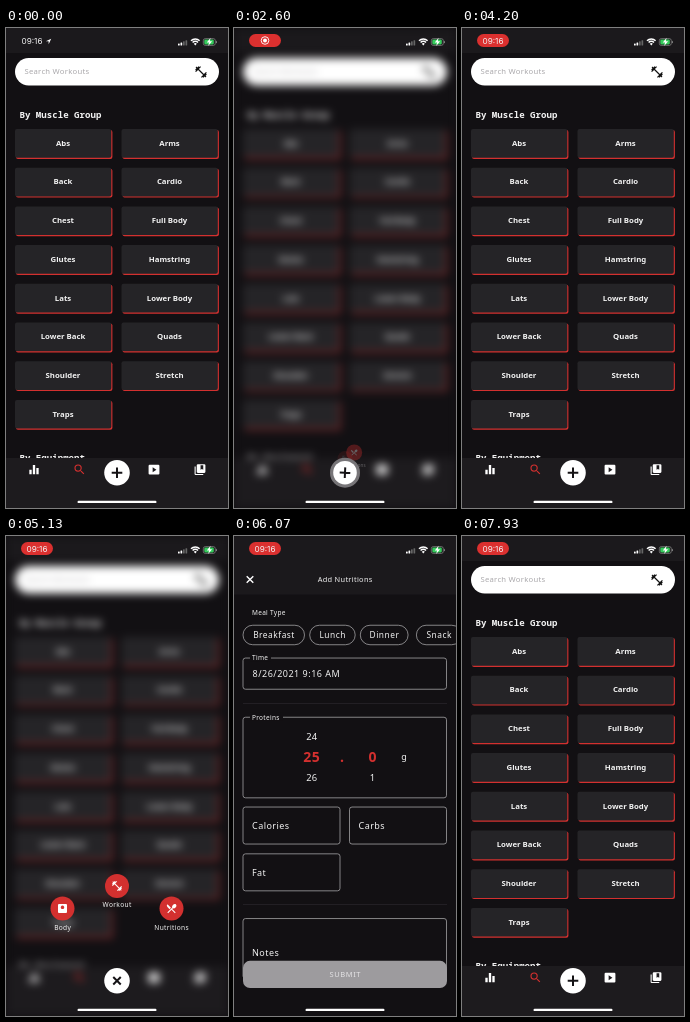
An HTML page for the animation above (8000 ms loop, 222 by 480 pixels).

```html
<!DOCTYPE html>
<html lang="en">
<head>
<meta charset="utf-8">
<title>Workout app</title>
<style>
html, body { margin: 0; height: 100%; overflow: hidden; background: #121013; }
svg { display: block; width: 100vw; height: 100vh; }
text { font-family: "Noto Sans", "Open Sans", sans-serif; fill: #f2f2f2; white-space: pre; }
.mono { font: bold 9.1px "Noto Sans Mono", "DejaVu Sans Mono", monospace; }
.clock { font: 400 8.2px Inter, Roboto, sans-serif; }
.line { fill: none; stroke: #a3a1a4; stroke-width: .8; }
</style>
</head>
<body>
<svg viewBox="0 0 222 480">
  <g id="home"></g>
  <g id="menu"></g>
  <g id="fab">
    <circle id="press" r="15" fill="#777578"/>
    <circle id="disc" r="12.8" fill="#fff"/>
    <path id="plus" d="M-5.3 0H5.3M0-5.3V5.3" stroke="#151316" stroke-width="2"/>
  </g>
  <g id="sheet"></g>
  <g id="status"></g>
  <rect x="71.5" y="472.7" width="79" height="2.4" rx="1.2" fill="#fff"/>
</svg>
<script>
const $ = id => document.getElementById(id);
const RED = '#d3302f';

const rect = (x, y, w, h, rx, attrs) =>
  `<rect x="${x}" y="${y}" width="${w}" height="${h}" rx="${rx}" ${attrs}/>`;
const label = (s, x, y, size, { gap = 0, mid = 0, fill = '#f2f2f2', weight = 400 } = {}) =>
  `<text x="${x + (mid ? gap / 2 : 0)}" y="${y}" font-size="${size}" font-weight="${weight}"
    letter-spacing="${gap}" text-anchor="${mid ? 'middle' : 'start'}" style="fill:${fill}">${s}</text>`;
// 24-unit icon centred on (x, y)
const icon = (name, x, y, size, fill = '#fff') =>
  `<path transform="translate(${x} ${y}) scale(${size / 24}) translate(-12 -12)"
    fill="${fill}" fill-rule="evenodd" d="${ICONS[name]}"/>`;

const ICONS = {
  dumbbell: 'M20.57 14.86 22 13.43 20.57 12 17 15.57 8.43 7 12 3.43 10.57 2 9.14 3.43 7.71 2 5.57 4.14 4.14 2.71 2.71 4.14l1.43 1.43L2 7.71l1.43 1.43L2 10.57 3.43 12 7 8.43 15.57 17 12 20.57 13.43 22l1.43-1.43L16.29 22l2.14-2.14 1.43 1.43 1.43-1.43-1.43-1.43L22 16.29z',
  cutlery: 'M8.1 13.34l2.83-2.83L3.91 3.5a4 4 0 0 0 0 5.66zm6.78-1.81c1.53.71 3.68.21 5.27-1.38 1.91-1.91 2.28-4.65.81-6.12-1.46-1.46-4.2-1.1-6.12.81-1.59 1.59-2.09 3.74-1.38 5.27L3.7 19.87l1.41 1.41L12 14.41l6.88 6.88 1.41-1.41L13.41 13z',
  scale: 'M5 3H19a2 2 0 0 1 2 2V19a2 2 0 0 1-2 2H5a2 2 0 0 1-2-2V5a2 2 0 0 1 2-2zM12 6a3.5 3.5 0 1 0 .01 0z',
  search: 'M15.5 14h-.79l-.28-.27A6.47 6.47 0 0 0 16 9.5 6.5 6.5 0 1 0 9.5 16c1.61 0 3.09-.59 4.23-1.57l.27.28v.79l5 4.99L20.49 19zm-6 0a4.5 4.5 0 1 1 0-9 4.5 4.5 0 0 1 0 9z',
  bars: 'M10 20h4V4h-4zM4 20h4v-8H4zM16 9v11h4V9z',
  play: 'M4 3H20a2 2 0 0 1 2 2V19a2 2 0 0 1-2 2H4a2 2 0 0 1-2-2V5a2 2 0 0 1 2-2zM9.5 7.5v9l7-4.5z',
  library: 'M4 6H2v14a2 2 0 0 0 2 2h14v-2H4zM8 2H20a2 2 0 0 1 2 2V16a2 2 0 0 1-2 2H8a2 2 0 0 1-2-2V4a2 2 0 0 1 2-2zM13 4v8l2.5-1.5L18 12V4z',
  arrow: 'M2 11.5 22 2 12.5 22V11.5z'
};

function buildHome() {
  const names = ['Abs', 'Arms', 'Back', 'Cardio', 'Chest', 'Full Body', 'Glutes', 'Hamstring',
    'Lats', 'Lower Body', 'Lower Back', 'Quads', 'Shoulder', 'Stretch', 'Traps'];
  const tiles = names.map((name, i) => {
    const x = i % 2 ? 115.5 : 9, y = 101 + 38.7 * (i >> 1);
    return rect(x + 1, y + 1, 96.4, 28.9, 2, `fill="${RED}"`) +
      rect(x, y, 96.3, 28.7, 2, 'fill="#252427"') +
      label(name, x + 48, y + 16.7, 7.8, { mid: 1, weight: 600 });
  });
  $('home').innerHTML =
    rect(0, 0, 222, 480, 0, 'fill="#121013"') +
    rect(0, 0, 222, 25, 0, 'fill="#1b191c"') +
    rect(9, 30, 204, 27.5, 13.7, 'fill="#fff"') +
    label('Search Workouts', 18.5, 46.3, 7.7, { gap: .25, fill: '#aaa8ab' }) +
    icon('dumbbell', 195, 44, 14, '#111') +
    '<text class="mono" x="13.5" y="90">By Muscle Group</text>' + tiles.join('') +
    '<text class="mono" x="13.5" y="433">By Equipment</text>' +
    rect(0, 430, 222, 50, 0, 'fill="#1d1b1e"') +
    icon('bars', 28, 441.7, 14) + icon('search', 73.5, 441.5, 13.5, RED) +
    icon('play', 148, 441.7, 13) + icon('library', 194, 441.7, 13);
}

const ITEMS = [
  { name: 'Nutritions', glyph: 'cutlery', x: 165.5, y: 372.5 },
  { name: 'Workout', glyph: 'dumbbell', x: 111, y: 350 },
  { name: 'Body', glyph: 'scale', x: 56.5, y: 372.5 }
];

function buildMenu() {
  $('menu').innerHTML = ITEMS.map(it =>
    `<g><circle r="12" fill="${RED}"/>${icon(it.glyph, 0, 0, 12)}` +
    label(it.name, 0, 21.4, 6.6, { gap: .35, mid: 1 }) + '</g>').join('');
}

function buildSheet() {
  const box = (x, y, w, h) => rect(x, y, w, h, 2.5, 'class="line"');
  const caption = (s, y, w) => rect(16, y - 5, w, 8, 0, 'fill="#121013"') +
    label(s, 18, y + 2.3, 6.5, { gap: .3 });
  const rule = y => rect(9, y, 204, .8, 0, 'fill="#262428"');
  const chips = [['Breakfast', 9, 61.5], ['Lunch', 75.7, 45.5], ['Dinner', 126.3, 47.8], ['Snack', 182.4, 45]];
  const big = { mid: 1, gap: .3, weight: 600, fill: RED };
  const num = { mid: 1, gap: .3 };
  const field = { gap: .45 };
  $('sheet').innerHTML =
    rect(0, 0, 222, 480, 0, 'fill="#121013"') + rect(0, 0, 222, 58, 0, 'fill="#1b191c"') +
    '<path d="M12.7 39.7l6.6 6.6m0-6.6l-6.6 6.6" stroke="#fff" stroke-width="1.4"/>' +
    label('Add Nutritions', 111, 45.3, 7.4, { gap: .3, mid: 1 }) +
    label('Meal Type', 18, 78, 6.5, { gap: .3 }) +
    chips.map(([s, x, w]) => rect(x, 88.7, w, 19.5, 9.7, 'class="line"') +
      label(s, x + w / 2, 101.5, 8.4, { gap: .5, mid: 1 })).join('') +
    box(9, 121.5, 203.5, 31.2) + caption('Time', 121.5, 21) +
    label('8/26/2021 9:16 AM', 18.5, 140, 9, { gap: .5 }) + rule(166.5) +
    box(9, 180.7, 203.5, 80.6) + caption('Proteins', 180.7, 33) +
    label('24', 77.7, 203.2, 9.4, num) + label('26', 77.7, 244.2, 9.4, num) +
    label('1', 138.5, 244.2, 9.4, num) + label('g', 170, 223.5, 9, num) +
    label('25', 77.5, 225, 14, big) + label('.', 108, 225, 14, big) +
    label('0', 138.5, 225, 14, big) +
    box(9, 270.5, 97, 37) + label('Calories', 18, 292.3, 9, field) +
    box(115.5, 270.5, 97, 37) + label('Carbs', 124.5, 292.3, 9, field) +
    box(9, 317.3, 97, 37) + label('Fat', 18, 339, 9, field) + rule(367.5) +
    box(9, 382, 203.5, 60) + label('Notes', 18, 419.3, 9, field) +
    rect(9, 424.3, 204, 27.2, 7, 'fill="#9d9b9e"') +
    label('SUBMIT', 111, 440.4, 7.5, { gap: .6, mid: 1, fill: '#e4e3e5' });
}

function buildStatus() {
  const signal = [0, 1, 2, 3].map(i =>
    rect(172 + i * 2.5, 15.5 - i * 1.1, 1.7, 2 + i * 1.1, .5, `fill="${i < 2 ? '#fff' : '#666'}"`)).join('');
  $('status').innerHTML =
    rect(15, 6, 32, 13, 6.5, 'id="pill" fill="#db302f"') +
    '<text id="clock" class="clock" y="16" text-anchor="middle">09:16</text>' +
    `<g id="arrow">${icon('arrow', 42.5, 13.5, 6.5)}</g>` +
    '<g id="rec"><circle cx="31" cy="12.5" r="3.8" fill="none" stroke="#fff" stroke-width=".9"/>' +
    '<circle cx="31" cy="12.5" r="2" fill="#fff"/></g>' + signal +
    '<path d="M185 12.7a6.1 6.1 0 0 1 8.6 0M186.6 14.5a3.8 3.8 0 0 1 5.4 0" fill="none" stroke="#fff" stroke-width="1.5"/>' +
    '<path d="M187.8 15.7a2.1 2.1 0 0 1 3 0l-1.5 1.7z" fill="#fff"/>' +
    rect(197.3, 10.6, 12, 6.8, 2, 'fill="none" stroke="#8b8b8b" stroke-width=".7"') +
    rect(198.3, 11.6, 9.5, 4.8, 1.1, 'fill="#36cb5c"') +
    rect(210, 12.8, .9, 2.4, .4, 'fill="#8b8b8b"') +
    '<path d="M204.6 9.8l-3.8 4.6h2.3l-.9 3.6 3.9-4.7h-2.3z" fill="#fff"/>';
}

const unit = (t, start, dur) => Math.min(1, Math.max(0, (t - start) / dur));
const smooth = (t, start, dur) => { const u = unit(t, start, dur); return u * u * (3 - 2 * u); };
const settle = (t, start, dur) => 1 - (1 - unit(t, start, dur)) ** 4;

const TAPS = [[2350, 3650], [4220, 5230]];   // menu open and close times
const opened = (t, delay, dur) => Math.max(...TAPS.map(([a, b]) =>
  smooth(t, a + delay, dur) * (1 - smooth(t, b, 280))));
const show = (id, v) => $(id).setAttribute('opacity', v);
const move = (el, x, y, rest = '') => el.setAttribute('transform', `translate(${x} ${y}) ${rest}`);

function draw(t) {
  const veil = opened(t, 0, 220);
  $('home').style.filter = veil ? `blur(${4 * veil}px)` : 'none';

  ITEMS.forEach((it, i) => {
    const p = opened(t, 165 + 40 * i, 330), el = $('menu').children[i];
    move(el, 111 + (it.x - 111) * p, 435 + (it.y - 435) * p, `scale(${.6 + .4 * p})`);
    el.setAttribute('opacity', Math.min(1, 2 * p));
  });
  $('plus').setAttribute('transform', `rotate(${45 * opened(t, 210, 280)})`);
  const press = Math.max(...TAPS.map(([a]) => smooth(t, a + 80, 120) * (1 - smooth(t, a + 300, 160))));
  show('press', press);
  $('disc').setAttribute('r', 12.8 - press);

  const up = settle(t, 5642, 525) - settle(t, 7420, 490);
  move($('sheet'), 0, 480 * (1 - up));

  const pill = smooth(t, 60, 450);
  const rec = smooth(t, 550, 320) - smooth(t, 2950, 300);
  show('pill', pill);
  show('arrow', 1 - pill);
  show('rec', rec);
  show('clock', 1 - rec);
  $('clock').setAttribute('x', 26 + 5 * pill);
}

buildHome();
buildMenu();
buildSheet();
buildStatus();
move($('fab'), 111, 444.7);

const begin = performance.now();
(function tick() {
  draw((performance.now() - begin) % 8000);
  requestAnimationFrame(tick);
})();
</script>
</body>
</html>
```
